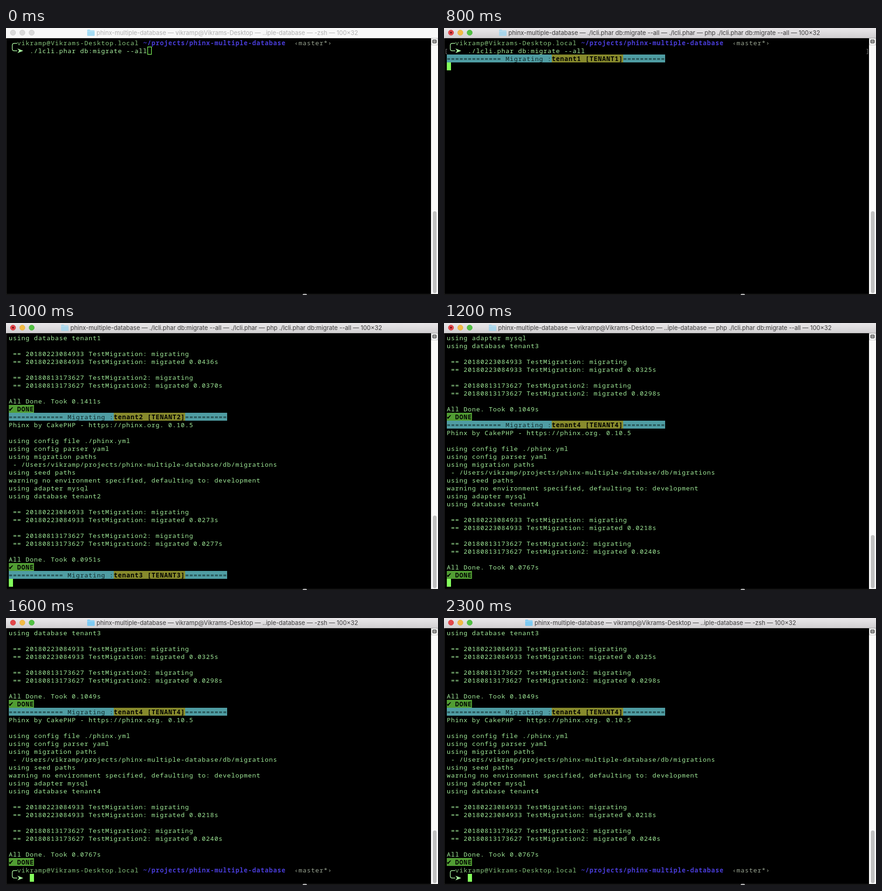
An HTML page that plays this animation: 926 by 574 pixels, repeating every 2.4 s.

```html
<!DOCTYPE html>
<html lang="en">
<head>
<meta charset="utf-8">
<title>Terminal</title>
<style>
  html, body { margin: 0; width: 100%; height: 100%; overflow: hidden; background: #000; }
  svg { display: block; width: 926px; height: 574px; }
  text { white-space: pre; }
  .term { font: 300 13.4px "Noto Sans Mono", "DejaVu Sans Mono", monospace; letter-spacing: .96px; }
  .bold { font-weight: 700; }
  .bar { font: 400 12.9px Inter, Roboto, sans-serif; }
  .mark { font: 14px "DejaVu Sans", sans-serif; }
</style>
</head>
<body>
<svg id="stage" viewBox="0 0 926 574"></svg>
<script>
const LOOP = 2400, COLS = 9, ROW = 17, LEFT = 6, TOP = 23, ROWS = 32, BASE = 14;
const stage = document.getElementById('stage');
const C = {
  text: '#a0ea98', host: '#86c47c', command: '#a8f09e', path: '#493cd8', branch: '#9ba693',
  cursor: '#84ff5c', teal: '#4f9da3', olive: '#878a2c', done: '#519d33'
};
const user = 'vikramp', host = 'Vikrams-Desktop', project = 'phinx-multiple-database';
const command = './lcli.phar db:migrate --all';
const colX = col => LEFT + col * COLS;
const rowY = row => TOP + row * ROW;

const rect = (x, y, w, h, fill, extra = '') =>
  `<rect x="${x}" y="${y}" width="${w}" height="${h}" fill="${fill}" ${extra}/>`;
const text = (x, y, s, fill, cls = 'term') => `<text x="${x}" y="${y}" fill="${fill}" class="${cls}">${s}</text>`;
const cell = (col, row, s, fill, cls) => text(colX(col), rowY(row) + BASE, s, fill, cls);
const back = (col, row, n, fill) => rect(colX(col), rowY(row), n * COLS, ROW, fill);
const stroke = (d, color) => `<path d="${d}" fill="none" stroke="${color}" stroke-width="1.5"/>`;

// Each terminal line is a function of the row it lands on.
const plain = s => row => cell(0, row, s, C.text);

const promptTop = row => {
  const y = rowY(row);
  return stroke(`M13.5 ${y + 17}V${y + 14}Q13.5 ${y + 10} 18 ${y + 10}H24`, C.command) +
    cell(2, row, `${user}@${host}.local`, C.host) +
    cell(32, row, `~/projects/${project}`, C.path, 'term bold') +
    cell(68, row, '‹master*›', C.branch);
};

const promptEnd = (typed, framed) => row => {
  const y = rowY(row);
  return stroke(`M13.5 ${y}V${y + 5}Q13.5 ${y + 9} 18 ${y + 9}H24`, C.command) +
    `<path d="M24.5 ${y + 4}L37 ${y + 9}L24.5 ${y + 14}L28 ${y + 9}Z" fill="${C.command}"/>` +
    cell(5, row, typed, C.command) +
    (framed ? text(0.5, y + BASE, '[', '#777') + text(904, y + BASE, ']', '#777') : '');
};

const banner = n => row =>
  back(0, row, 25, C.teal) + back(25, row, 17, C.olive) + back(42, row, 10, C.teal) +
  cell(0, row, '============= Migrating :', '#10282a') +
  cell(25, row, `tenant${n} [TENANT${n}]`, '#000', 'term bold') +
  cell(42, row, '==========', '#10282a');

const doneLine = row => back(0, row, 6, C.done) +
  text(colX(0) - 1, rowY(row) + BASE, '✔', '#000', 'mark') + cell(2, row, 'DONE', '#000', 'term bold');

const report = (n, first, second, total) => [
  ...['Phinx by CakePHP - https://phinx.org. 0.10.5', '',
    'using config file ./phinx.yml', 'using config parser yaml', 'using migration paths',
    ` - /Users/${user}/projects/${project}/db/migrations`, 'using seed paths',
    'warning no environment specified, defaulting to: development',
    'using adapter mysql', `using database tenant${n}`, '',
    ' == 20180223084933 TestMigration: migrating',
    ` == 20180223084933 TestMigration: migrated ${first}s`, '',
    ' == 20180813173627 TestMigration2: migrating',
    ` == 20180813173627 TestMigration2: migrated ${second}s`, '',
    `All Done. Took ${total}s`].map(plain), doneLine];

const idle = [promptTop, promptEnd(command, false)];
const started = [promptTop, promptEnd(command, true)];
const one = [...started, banner(1)];
const two = [...one, ...report(1, '0.0436', '0.0370', '0.1411'), banner(2)];
const three = [...two, ...report(2, '0.0273', '0.0277', '0.0951'), banner(3)];
const four = [...three, ...report(3, '0.0325', '0.0298', '0.1049'), banner(4)];
const finished = [...four, ...report(4, '0.0218', '0.0240', '0.0767')];
const ready = [...finished, promptTop, promptEnd('', false)];

const home = `${user}@${host} — ..iple-database`;
const titles = {
  shell: { x: 194, s: `${home} — -zsh` },
  launch: { x: 215, s: `${command} — ./lcli.phar — -zsh` },
  php: { x: 138, s: `${command} — ./lcli.phar — php ${command}`, busy: true },
  last: { x: 116, s: `${home} — php ${command}`, busy: true }
};

const states = [
  { at: 0, lines: idle, title: titles.shell, inactive: true, col: 33 },
  { at: 400, lines: started, title: titles.launch },
  { at: 500, lines: started, title: titles.php },
  { at: 600, lines: one, title: titles.php },
  { at: 900, lines: two, title: titles.php },
  { at: 1000, lines: three, title: titles.php },
  { at: 1100, lines: four, title: titles.php },
  { at: 1200, lines: finished, title: titles.last },
  { at: 1300, lines: ready, title: titles.shell, col: 5 }
];

function titleBar({ title, inactive }) {
  const lights = inactive ? ['#dadada', '#dadada', '#dadada'] : ['#e2474b', '#f2bb45', '#52c043'];
  const rims = inactive ? ['#c8c8c8', '#c8c8c8', '#c8c8c8'] : ['#d34145', '#e3ac3e', '#47b03b'];
  const folder = inactive ? '#a5dcf4' : title.busy ? '#a9d5ea' : '#7fcbf2';
  const fx = title.x - 20;
  return rect(0, 0, 926, 22, inactive ? '#f8f8f8' : 'url(#bar)') +
    rect(0, 21, 926, 1, inactive ? '#dedede' : '#b5b3b5') +
    lights.map((c, i) =>
      `<circle cx="${15 + 20 * i}" cy="10" r="5.7" fill="${c}" stroke="${rims[i]}" stroke-width=".8"/>`).join('') +
    (title.busy ? '<circle cx="15" cy="10" r="2" fill="#6d1012"/>' : '') +
    `<path d="M${fx} 5q0-1.5 1.5-1.5h4l1.5 1.5h7.5q1.5 0 1.5 1.5v9q0 1.5-1.5 1.5h-13q-1.5 0-1.5-1.5z" fill="${folder}"/>` +
    rect(fx, 6.5, 16, 1, '#fff', 'opacity=".35"') +
    text(title.x, 15, `${project} — ${title.s} — 100×32`, inactive ? '#b1b1b1' : '#3d3c3d', 'bar');
}

function scrollBar(scroll) {
  const h = 16474 / (93.6 + scroll);
  return rect(911, 22, 15, 550, '#fafafa') +
    rect(911.5, 22.5, 14, 14, '#fafafa', 'stroke="#c4c4c4"') +
    rect(914.5, 25.5, 8, 7, '#777', 'stroke="#444" rx="1"') +
    rect(916, 27, 5, 1, '#ddd') + rect(916, 30, 5, 1, '#ddd') +
    rect(915, 570 - h, 8, h, '#c1c1c1', 'rx="4"');
}

function draw(state) {
  const { lines, col, inactive } = state;
  const cursorLine = col === undefined ? lines.length : lines.length - 1;
  const scroll = Math.max(0, cursorLine + 1 - ROWS);
  const cx = colX(col || 0), cy = rowY(cursorLine - scroll);
  stage.innerHTML =
    `<defs><linearGradient id="bar" x2="0" y2="1">
      <stop stop-color="#e9e7e9"/><stop offset="1" stop-color="#d1cfd1"/></linearGradient></defs>` +
    rect(0, 0, 926, 574, '#000') +
    stroke('M.5 22V572.5H911', '#242424') +
    lines.slice(scroll).map((line, row) => line(row)).join('') +
    (inactive
      ? rect(cx + .7, cy + .7, 8, 16, 'none', `stroke="${C.cursor}" stroke-width="1.3"`)
      : rect(cx, cy, COLS, ROW, C.cursor)) +
    titleBar(state) + scrollBar(scroll) +
    rect(636, 571.5, 9, 4, '#b9b9b9', 'rx="2"');
}

let shown;
function tick(now) {
  const t = now % LOOP;
  const state = states.filter(s => s.at <= t).pop();
  if (state !== shown) draw(shown = state);
  requestAnimationFrame(tick);
}
tick(0);
</script>
</body>
</html>
```
